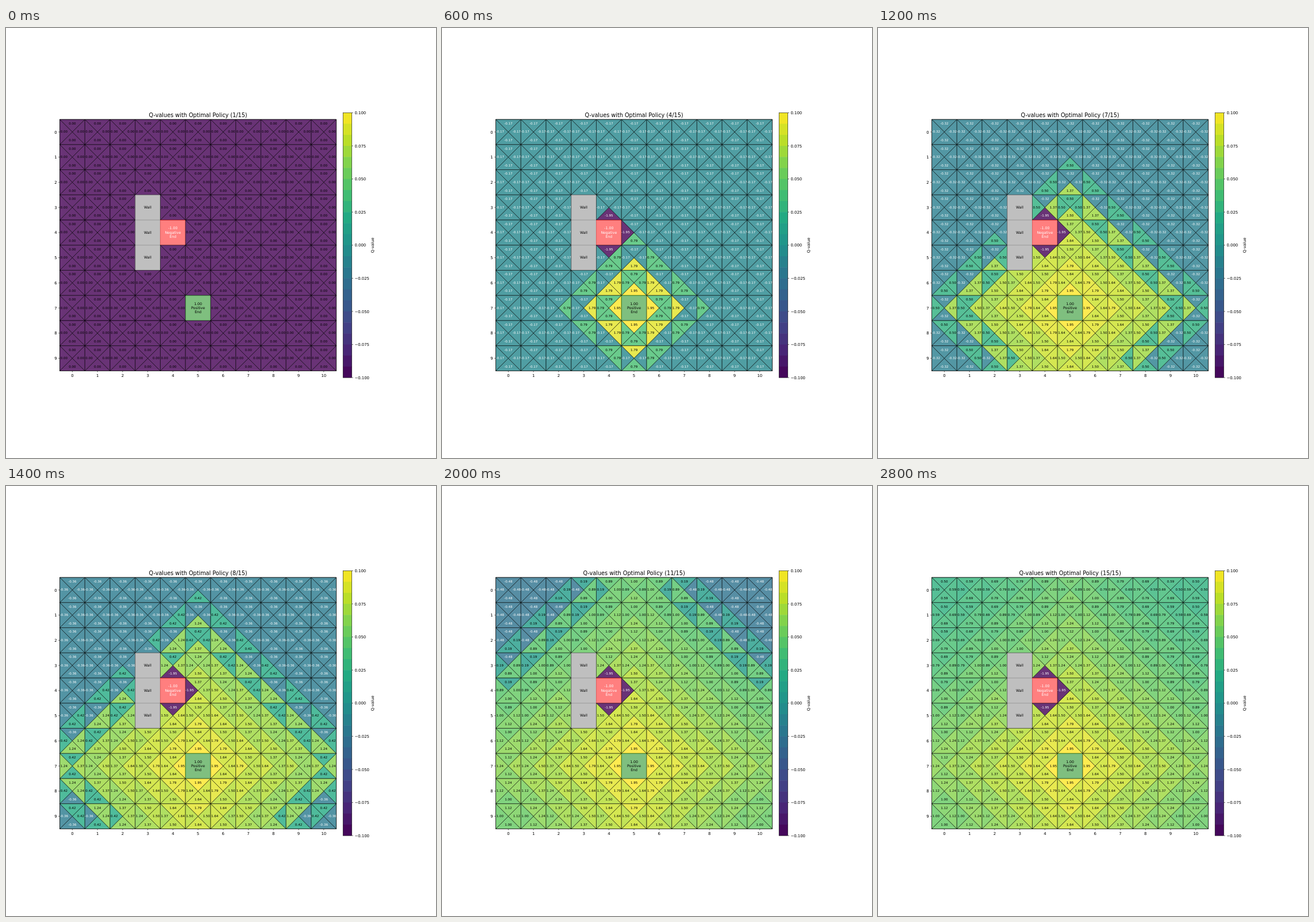
An HTML page with a canvas for the animation above (3000 ms loop, 748 by 748 pixels).

```html
<!DOCTYPE html>
<html>
<head>
<meta charset="utf-8">
<title>Q-values</title>
<style>
  html, body { margin: 0; width: 100%; height: 100%; overflow: hidden; background: #fff; }
  canvas { display: block; }
</style>
</head>
<body>
<canvas id="stage" width="748" height="748"></canvas>
<script>
const ctx = document.getElementById('stage').getContext('2d');
const PT = 748 / 1080;               // one typographic point in stage pixels
const COLS = 11, ROWS = 10, STEPS = 15, STEP_MS = 200;
const CELL = 43.74, LEFT = 93.5, TOP = 159.04;
const RIGHT = LEFT + COLS * CELL, BOTTOM = TOP + ROWS * CELL;
const BAR = { x: 586.2, y: 147.4, w: 15.36, h: 460.8, bands: 24 };
const GAMMA = 0.95, STEP_REWARD = -0.06;
const MOVES = [[0, -1], [0, 1], [-1, 0], [1, 0]];

const SPECIAL = {
  '3,3': { fill: '#808080', lines: ['Wall'], wall: true },
  '3,4': { fill: '#808080', lines: ['Wall'], wall: true },
  '3,5': { fill: '#808080', lines: ['Wall'], wall: true },
  '4,4': { fill: '#ff0000', lines: ['-1.00', 'Negative', 'End'], reward: -1, ink: '#fff' },
  '5,7': { fill: '#008000', lines: ['1.00', 'Positive', 'End'], reward: 1 }
};
const special = (x, y) => SPECIAL[x + ',' + y];

const VIRIDIS = ['440154', '482475', '414487', '355f8d', '2a788e', '21918c',
  '22a884', '44bf70', '7ad151', 'bddf26', 'fde725']
  .map(hex => [0, 2, 4].map(i => parseInt(hex.slice(i, i + 2), 16)));

function viridis(t) {
  const pos = Math.min(1, Math.max(0, t)) * 10;
  const i = Math.min(9, Math.floor(pos));
  return `rgb(${VIRIDIS[i].map((c, k) => Math.round(c + (VIRIDIS[i + 1][k] - c) * (pos - i)))})`;
}

// Value iteration: each step holds q[y][x][move].
function nextValues(q) {
  const best = (x, y) => Math.max(...q[y][x]);
  return q.map((row, y) => row.map((_, x) => {
    const own = special(x, y);
    if (own && own.reward) return MOVES.map(() => own.reward);
    return MOVES.map(([dx, dy]) => {
      let nx = x + dx, ny = y + dy;
      const blocked = nx < 0 || ny < 0 || nx >= COLS || ny >= ROWS || special(nx, ny)?.wall;
      if (blocked) [nx, ny] = [x, y];
      return (special(nx, ny)?.reward || STEP_REWARD) + GAMMA * best(nx, ny);
    });
  }));
}

const history = [Array.from({ length: ROWS }, () =>
  Array.from({ length: COLS }, () => [0, 0, 0, 0]))];
while (history.length < STEPS) history.push(nextValues(history[history.length - 1]));

function text(str, x, y, points, align = 'center', ink = '#000') {
  ctx.font = `${points * PT}px "DejaVu Sans", sans-serif`;
  ctx.textAlign = align;
  ctx.fillStyle = ink;
  ctx.fillText(str, x, y);
}

function line(x1, y1, x2, y2) {
  ctx.beginPath();
  ctx.moveTo(x1, y1);
  ctx.lineTo(x2, y2);
  ctx.stroke();
}

function drawTriangle(cx, cy, [dx, dy], fill) {
  const h = CELL / 2;
  ctx.beginPath();
  ctx.moveTo(cx, cy);
  ctx.lineTo(cx + (dx + dy) * h, cy + (dy + dx) * h);
  ctx.lineTo(cx + (dx - dy) * h, cy + (dy - dx) * h);
  ctx.closePath();
  ctx.fillStyle = fill;
  ctx.fill();
  ctx.stroke();
}

function eachCell(visit) {
  for (let y = 0; y < ROWS; y++)
    for (let x = 0; x < COLS; x++)
      visit(x, y, LEFT + (x + 0.5) * CELL, TOP + (y + 0.5) * CELL, special(x, y));
}

function drawGrid(q) {
  const all = q.flat(2);
  const min = Math.min(...all), span = Math.max(...all) - min || 1;

  ctx.lineWidth = PT;
  eachCell((x, y, cx, cy, own) => {
    if (own) {
      ctx.globalAlpha = 0.5;
      ctx.fillStyle = ctx.strokeStyle = own.fill;
      ctx.beginPath();
      ctx.rect(cx - CELL / 2, cy - CELL / 2, CELL, CELL);
      ctx.fill();
      ctx.stroke();
    } else {
      ctx.globalAlpha = 0.8;
      ctx.strokeStyle = '#000';
      MOVES.forEach((move, k) => drawTriangle(cx, cy, move, viridis((q[y][x][k] - min) / span)));
    }
  });
  ctx.globalAlpha = 1;

  eachCell((x, y, cx, cy, own) => {
    if (own) {
      const size = 9 * PT, middle = (own.lines.length - 1) / 2;
      own.lines.forEach((str, i) =>
        text(str, cx, cy + size * (0.276 + (i - middle) * 1.165), 9, 'center', own.ink));
    } else {
      MOVES.forEach(([dx, dy], k) => {
        const v = q[y][x][k];
        text(v.toFixed(2), cx + dx * CELL / 3, cy + dy * CELL / 3 + 1.53, 8, 'center',
          v < 0 ? '#fff' : '#000');
      });
    }
  });
}

function drawAxes() {
  const tick = 3.5 * PT, gap = 7 * PT, drop = 2.6;
  ctx.strokeStyle = '#000';
  ctx.lineWidth = 0.8 * PT;
  ctx.strokeRect(LEFT, TOP, RIGHT - LEFT, BOTTOM - TOP);
  for (let i = 0; i < COLS; i++) {
    const x = LEFT + (i + 0.5) * CELL;
    line(x, BOTTOM, x, BOTTOM + tick);
    text(i, x, BOTTOM + gap + 5.27, 10);
  }
  for (let i = 0; i < ROWS; i++) {
    const y = TOP + (i + 0.5) * CELL;
    line(LEFT - tick, y, LEFT, y);
    text(i, LEFT - gap, y + drop, 10, 'right');
  }

  const band = BAR.h / BAR.bands;
  for (let i = 0; i < BAR.bands; i++) {
    ctx.fillStyle = viridis(1 - (i + 0.5) / BAR.bands);
    ctx.fillRect(BAR.x, BAR.y + i * band, BAR.w, band + (i < BAR.bands - 1 ? 0.5 : 0));
  }
  ctx.strokeRect(BAR.x, BAR.y, BAR.w, BAR.h);
  const edge = BAR.x + BAR.w;
  for (let i = 0; i <= 8; i++) {
    const y = BAR.y + i * BAR.h / 8;
    line(edge, y, edge + tick, y);
    text(((4 - i) * 0.025).toFixed(3).replace('-', '\u2212'), edge + gap, y + drop, 10, 'left');
  }
  ctx.save();
  ctx.translate(640.2, BAR.y + BAR.h / 2);
  ctx.rotate(-Math.PI / 2);
  text('Q-value', 0, 0, 10);
  ctx.restore();
}

function draw(step) {
  ctx.fillStyle = '#fff';
  ctx.fillRect(0, 0, 748, 748);
  drawGrid(history[step]);
  drawAxes();
  text(`Q-values with Optimal Policy (${step + 1}/${STEPS})`, (LEFT + RIGHT) / 2, TOP - 6 * PT, 14);
}

let shown = -1;
const start = performance.now();
function tickFrame() {
  const step = Math.floor(Math.max(0, performance.now() - start) / STEP_MS) % STEPS;
  if (step !== shown) draw(shown = step);
  requestAnimationFrame(tickFrame);
}
tickFrame();
</script>
</body>
</html>
```
